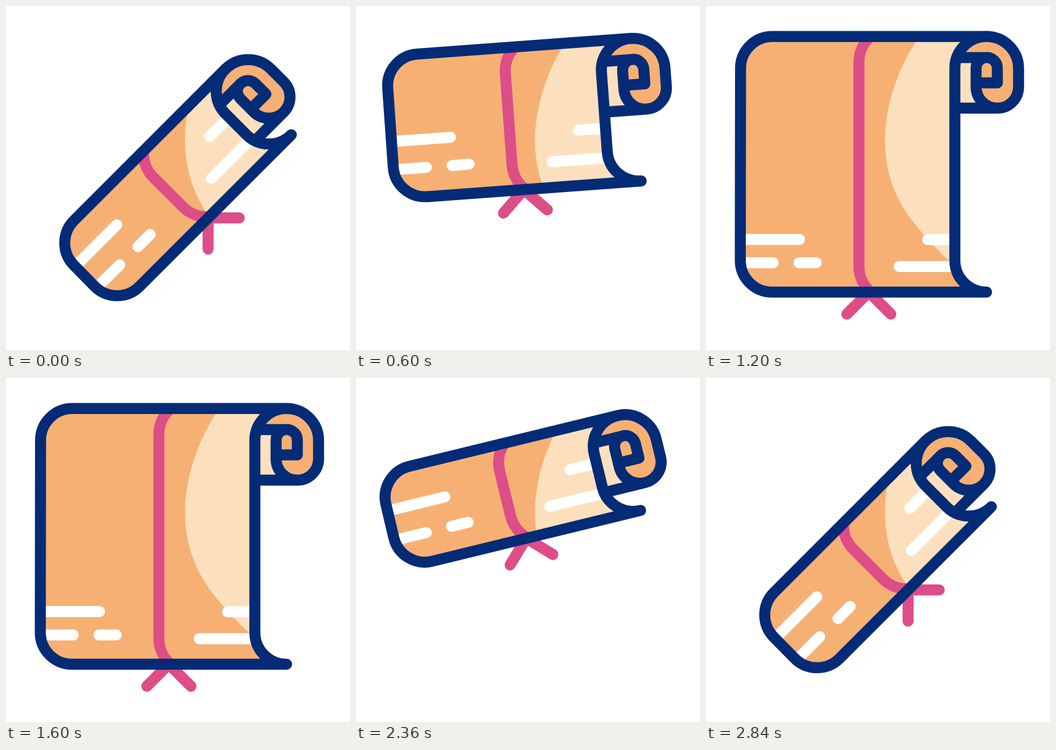
These frames come from a looping animation (640x640 px, 3000 ms). An HTML page with a canvas:

```html
<!DOCTYPE html>
<html lang="en">
<head>
<meta charset="utf-8">
<title>Scroll</title>
<style>
  html, body { margin: 0; width: 100%; height: 100%; overflow: hidden; background: #fff; }
  canvas { display: block; }
</style>
</head>
<body>
<canvas id="stage" width="640" height="640"></canvas>
<script>
const ctx = document.getElementById('stage').getContext('2d');
const NAVY = '#042b76', ORANGE = '#f6b074', CREAM = '#fce0be', PINK = '#dd4d88', WHITE = '#fff';
const LOOP = 3000, STROKE = 20.5, TOP = 56.8;
const ROLLED = 173, LOOSE = 454.6, OPEN = 496.5;

const clamp = t => Math.min(1, Math.max(0, t));
const smooth = t => t * t * (3 - 2 * t);

// cubic-bezier(x1, 0, x2, 1)
const bezier = (x1, x2) => x => {
  let lo = 0, hi = 1;
  for (let i = 0; i < 24; i++) {
    const u = (lo + hi) / 2, v = 1 - u;
    if (3 * v * v * u * x1 + 3 * v * u * u * x2 + u * u * u < x) lo = u; else hi = u;
  }
  return smooth(lo);
};
const turn = bezier(0.333, 0.283), unroll = bezier(0.53, 0.23);

// Steps: [start, end, target, easing]
function track(t, value, steps) {
  for (const [start, end, target, ease] of steps)
    value += (target - value) * ease(clamp((t - start) / (end - start)));
  return value;
}
const tiltAt = t => track(t, 1, [[200, 800, 0, turn], [2200, 2800, 1, turn]]);
const heightAt = t => track(t, ROLLED, [
  [400, 1000, OPEN, unroll], [1000, 1400, LOOSE, smooth],
  [1400, 1800, OPEN, smooth], [2000, 2400, ROLLED, smooth]
]);

const glow = new Path2D('M400 52C355 115 333 190 333 250C333 300 347 347 375 387C388 407 420 445 460 481H640V52Z');
const curl = new Path2D(`M522 ${TOP}A59.5 59.5 0 0 1 581.5 116.5V150.5A39.5 39.5 0 0 1 542 190H463V116A59 59 0 0 1 522 ${TOP}Z`);
const spiral = new Path2D(`M522 ${TOP}A59.5 59.5 0 0 1 581.5 116.5V150.5A39.5 39.5 0 0 1 502.5 150.5V115.5` +
  'A19.75 19.75 0 0 1 542 115.5V143H502.5M475 96H522M474 190H542');

function fill(path, color) {
  ctx.fillStyle = color;
  ctx.fill(path);
}
function stroke(path, color) {
  ctx.strokeStyle = color;
  ctx.stroke(path);
}
function dash(x1, x2, y) {
  stroke(new Path2D(`M${x1} ${y}H${x2}`), WHITE);
}

function draw(t) {
  const tilt = tiltAt(t), height = heightAt(t);
  const bottom = TOP + height, open = (height - ROLLED) / (OPEN - ROLLED);
  const sheet = new Path2D(`M123 ${TOP}H522A59 59 0 0 0 463 115.8V${bottom - 59}A59 59 0 0 0 522 ${bottom}` +
    `H123A59 59 0 0 1 63.8 ${bottom - 59}L64.3 115.8A59 59 0 0 1 123 ${TOP}Z`);
  const ribbon = new Path2D(`M306 ${TOP}A64 64 0 0 0 284.5 105V${bottom - 48}A64 64 0 0 0 306 ${bottom}`);
  const ties = new Path2D(`M262 ${bottom + 41}L303 ${bottom}L344 ${bottom + 41}`);

  ctx.setTransform(1, 0, 0, 1, 0, 0);
  ctx.fillStyle = WHITE;
  ctx.fillRect(0, 0, 640, 640);
  ctx.lineWidth = STROKE;
  ctx.lineCap = ctx.lineJoin = 'round';

  ctx.translate(508 - 52 * tilt, 138 + 46.4 * tilt);
  ctx.rotate(-tilt * Math.PI / 4);
  ctx.translate(-508, -138);

  stroke(ties, PINK);
  fill(sheet, ORANGE);

  ctx.save();
  ctx.clip(sheet);
  // The highlight stays still while the sheet turns under it.
  ctx.save();
  ctx.setTransform(1, 0, 0, 1, 0, 0);
  fill(glow, CREAM);
  ctx.restore();
  dash(50, 174, bottom - 111 + 14 * open);
  dash(50, 125, bottom - 54.5);
  dash(173, 205, bottom - 54.5);
  dash(412.5, 480, bottom - 105 + 8 * open);
  dash(359.5, 500, bottom - 47.5);
  stroke(ribbon, PINK);
  ctx.restore();

  fill(curl, ORANGE);
  ctx.fillStyle = CREAM;
  ctx.fillRect(463, 96, 42, 94);
  stroke(spiral, NAVY);
  stroke(sheet, NAVY);
}

function tick() {
  draw(performance.now() % LOOP);
  requestAnimationFrame(tick);
}
tick();
</script>
</body>
</html>
```
